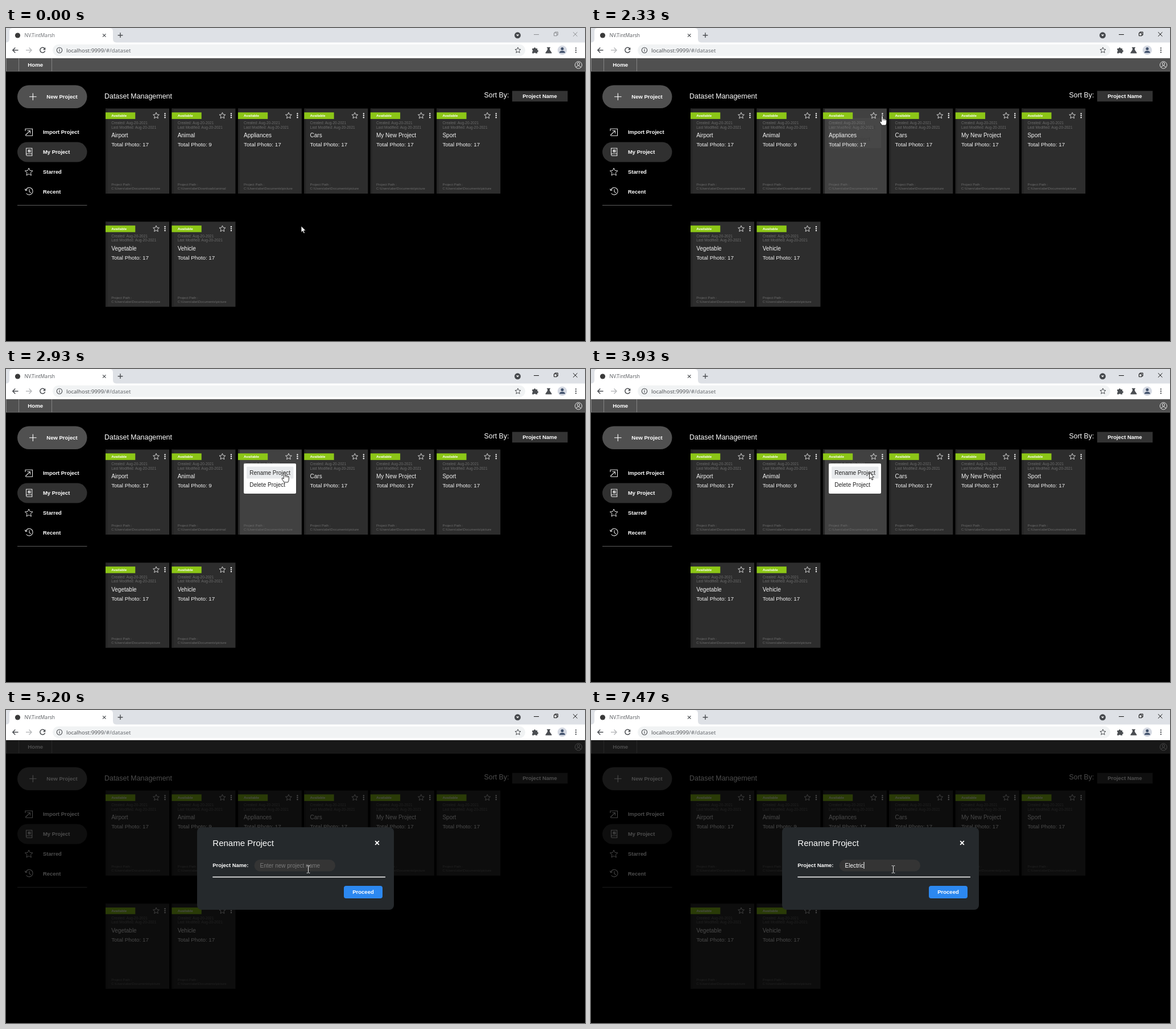
Recreate the animation shown at these times as an HTML page. Size 1018 by 550 pixels, loop 8000 ms.

```html
<!DOCTYPE html>
<html lang="en">
<head>
<meta charset="utf-8">
<title>Dataset Management</title>
<style>
  html, body { margin: 0; width: 100%; height: 100%; overflow: hidden; background: #000; }
  svg { display: block; width: 100%; height: 100%; font-family: "Liberation Sans", Arial, sans-serif; }
  .ui { font-family: "Open Sans", "Noto Sans", sans-serif; }
  .b { font-weight: bold; }
  text { white-space: pre; }
</style>
</head>
<body>
<svg id="stage" viewBox="0 0 1018 550"></svg>
<script>
const LOOP = 8000, FPS = 15;
const stage = document.getElementById('stage');

// Markup helpers
const rect = (x, y, w, h, fill, r = 0, more = '') =>
  `<rect x="${x}" y="${y}" width="${w}" height="${h}" rx="${r}" fill="${fill}" ${more}/>`;
const label = (x, y, size, fill, str, more = '') =>
  `<text x="${x}" y="${y}" font-size="${size}" fill="${fill}" ${more}>${str}</text>`;
const bold = (x, y, size, fill, str, more = '') => label(x, y, size, fill, str, `class="b" ${more}`);
const line = (d, stroke, width = 1, more = '') =>
  `<path d="${d}" fill="none" stroke="${stroke}" stroke-width="${width}" ${more}/>`;
const shape = (d, fill, more = '') => `<path d="${d}" fill="${fill}" ${more}/>`;
const disc = (x, y, r, fill, more = '') => `<circle cx="${x}" cy="${y}" r="${r}" fill="${fill}" ${more}/>`;
const ring = (x, y, r, stroke, width = 1) => disc(x, y, r, 'none', `stroke="${stroke}" stroke-width="${width}"`);
const group = (id, body, more = '') => `<g id="${id}" ${more}>${body}</g>`;
const dots = (x, y, gap, r, fill) => [-1, 0, 1].map(i => disc(x, y + i * gap, r, fill)).join('');
const cross = (x, y, r) => `M${x - r} ${y - r}l${2 * r} ${2 * r}m0 ${-2 * r}l${-2 * r} ${2 * r}`;
const plus = (x, y, r) => `M${x - r} ${y}h${2 * r}M${x} ${y - r}v${2 * r}`;

function star(x, y, r, stroke, width = 1) {
  let d = '';
  for (let i = 0; i < 10; i++) {
    const a = i * Math.PI / 5, k = i % 2 ? r * 0.46 : r;
    d += `${i ? 'L' : 'M'}${(x + k * Math.sin(a)).toFixed(2)} ${(y - k * Math.cos(a)).toFixed(2)}`;
  }
  return line(d + 'Z', stroke, width, 'stroke-linejoin="round"');
}

function browser() {
  const ink = '#4a4d51';
  return rect(0, 0, 1018, 53, '#dee1e6')
    + shape('M0 25.5Q6 25.5 6 19V6Q6 0 12 0H182Q188 0 188 6V19Q188 25.5 194 25.5H1018V53H0Z', '#fff')
    + disc(20.5, 13, 4.6, '#3a3a3a')
    + label(32.5, 16.2, 8.6, '#5f6368', 'NV.TintMarsh', 'class="ui" id="tab"')
    + line(cross(172.8, 13, 2.7), ink, 1.2) + line(plus(201, 12.7, 4.4), ink, 1.4)
    + disc(899.5, 12.8, 5.5, '#46494d') + shape('M896.8 11.6h5.4l-2.7 3z', '#fff')
    + group('win', line('M928 11.5h9M963.5 8.7h5v5h-5zM965 8.5v-1.5h5.3v5.3h-1.6', 'currentColor', 1)
        + line(cross(1000.8, 11, 3.7), 'currentColor', 1))
    + line('M21.5 39H12M16.3 34.5L11.8 39l4.5 4.5', ink, 1.5)
    + line('M35 39h9.8M40.5 34.5l4.5 4.5l-4.5 4.5', '#babcbe', 1.5)
    + line('M68 36.2A4.5 4.5 0 1 0 68.6 40.3', ink, 1.5) + shape('M69.4 34v4.6h-4.6z', ink)
    + rect(82, 28.7, 831, 20.6, '#f1f3f4', 10.3)
    + ring(94, 39, 4.7, ink, 1.1) + line('M94 38.3v3.2M94 36.2v1.2', ink, 1.2)
    + label(106, 42.5, 9.8, '#45484c', 'localhost:9999<tspan fill="#5f6368">/#/dataset</tspan>', 'class="ui"')
    + star(900, 39.2, 5.3, ink)
    + shape('M925.2 36h2.6a1.8 1.8 0 0 1 3.6 0h2.8v2.7a1.8 1.8 0 0 1 0 3.6v2.3h-3a1.7 1.7 0 0 0-3.2 0h-2.8v-3a1.7 1.7 0 0 0 0-3.1z', ink)
    + shape('M951 33.7h6v1.3h-1v3.3l3.6 5.2q.3 1-.8 1h-9.6q-1.1 0-.8-1l3.6-5.2V35h-1z', ink)
    + disc(978, 39, 8.2, '#d5d9e2') + disc(978, 36.6, 2.5, '#41516b') + shape('M973 43.7q0-3.6 5-3.6t5 3.6z', '#41516b')
    + dots(1002, 39, 3.7, 1.15, ink);
}

function navBar() {
  return rect(0, 53, 1018, 23.5, '#505050')
    + line('M0 53.5H1018M0 75.8H1018', '#666', 0.8)
    + line('M.5 53V76M22.5 53V76M80.5 53V76', '#8a8a8a', 0.9)
    + bold(38.3, 68, 9.7, '#fff', 'Home')
    + ring(1006.5, 65, 6.1, '#e8e8e8') + ring(1006.5, 63, 2.2, '#e8e8e8')
    + line('M1002.4 69.3q.6-3 4.1-3t4.1 3', '#e8e8e8');
}

function sidebar() {
  const w = '#e6e6e6';
  const items = [['Import Project', 186], ['My Project', 221], ['Starred', 255.7], ['Recent', 290.5]];
  return rect(20, 100.5, 122.5, 40.5, '#505050', 20.2)
    + line(plus(47.3, 120.8, 6.3), '#fff', 1.1)
    + bold(71.3, 124.2, 9.5, '#fff', 'New Project')
    + rect(20, 200.5, 122.5, 35, '#303030', 17.5)
    + items.map(([s, y]) => bold(65, y, 9.4, '#fff', s)).join('')
    + line('M34 181V177.3H46.5V189.3H34.5', w, 1.1) + line('M34 188.5L42.3 180.6M37.5 180.5h5v5', w, 1.1)
    + line('M35.5 222.3V211.3H45.8V224.5H37.2Q35.5 224.5 35.5 222.6Q35.5 221 37.2 221H45.8', w, 1.1)
    + rect(38.5, 213.8, 5, 4.6, w) + line('M39.5 217.2l1.2-1.6l1.2 1l1-1.6', '#333', 0.7)
    + star(40.2, 253.2, 7.2, w)
    + line('M34.8 284.8A6.3 6.3 0 1 1 35.7 290.5M33.3 282.7l1.4 2.8l2.9-1', w, 1.1)
    + line('M41 283.3V287.7L44 289.6', w, 1.1)
    + line('M20 311.5H142.5', '#5c5c5c', 1.1);
}

function card(name, i) {
  const x = 175 + (i % 6) * 116.45, y = i < 6 ? 141.5 : 340.3, tx = x + 10.2, grey = '#6c6c6c';
  const count = name === 'Animal' ? 9 : 17;
  const dir = name === 'Animal' ? 'Downloads\\animal' : 'Documents\\picture';
  return rect(x, y, 112, 149.5, '#2d2d2d', 0, `id="card${i}"`)
    + rect(x, y, 3.2, 149.5, '#262626')
    + rect(x, y + 6.8, 52.3, 11.6, '#8cc617')
    + bold(tx, y + 14.5, 6.2, '#fff', 'Available')
    + star(x + 89, y + 12.6, 5.7, '#e4e4e4', 0.9)
    + dots(x + 104.5, y + 12.3, 3.4, 1.2, '#f0f0f0')
    + label(tx, y + 27.7, 6.48, grey, 'Created: Aug-20-2021')
    + label(tx, y + 35, 6.48, grey, 'Last Modified: Aug-20-2021')
    + label(tx, y + 50.8, 10, '#f4f4f4', name)
    + label(tx, y + 66.9, 9.85, '#f4f4f4', 'Total Photo: ' + count)
    + label(tx, y + 135.5, 6, grey, 'Project Path :')
    + label(tx, y + 142.8, 5.95, grey, 'C:\\Users\\abe\\' + dir);
}

function content() {
  const names = ['Airport', 'Animal', 'Appliances', 'Cars', 'My New Project', 'Sport', 'Vegetable', 'Vehicle'];
  return label(173, 123.6, 12.45, '#fff', 'Dataset Management')
    + label(840.6, 122.3, 12.3, '#fff', 'Sort By:')
    + rect(890, 110.5, 97.5, 18.7, '#333')
    + bold(938.5, 123, 9.5, '#fff', 'Project Name', 'text-anchor="middle"')
    + names.map(card).join('');
}

function menu() {
  return group('menu', rect(418, 166, 92, 53, '#fff', 2)
    + rect(423, 171.5, 82.5, 21, '#e8eaec', 1, 'id="pick"')
    + label(428.3, 186, 10, '#222', 'Rename Project')
    + label(428.3, 206.8, 10, '#222', 'Delete Project'));
}

function modal() {
  return group('modal', rect(0, 53, 1018, 497, '#000', 0, 'opacity=".7"')
    + rect(336, 206, 346, 145, '#25292c', 8)
    + label(363.3, 239, 15, '#fff', 'Rename Project')
    + line(cross(652.5, 233.5, 3.3), '#fff', 1.9)
    + bold(363.3, 276.3, 9.4, '#fff', 'Project Name:')
    + rect(436.5, 263, 142.5, 20.5, '#343434', 10.2)
    + label(446.5, 276.6, 10, '#fff', '', 'id="field"')
    + rect(447, 267, 1, 12, '#fff', 0, 'id="caret"')
    + line('M363.3 293.5H667', '#fff', 1.6)
    + rect(594, 309, 68, 22, '#2c88f0', 4)
    + bold(628, 323.4, 9.5, '#fff', 'Proceed', 'text-anchor="middle"'));
}

function pointer() {
  const edge = 'stroke="#111" stroke-width=".9" stroke-linejoin="round"';
  return group('cursor',
    group('arrow', shape('M0 0V11.2L2.6 8.8L4.5 13L6.4 12.2L4.6 8.1H8Z', '#fff', edge))
    + group('hand', shape('M-1.3 1.2Q0-1 1.3 1.2V5.3Q2.7 4.4 3.6 5.8Q5 5 5.8 6.5Q7.8 6.2 7.8 8.3V12Q7.8 14 6.3 17H-.8Q-1.6 14.8-3.8 12.3L-4.3 9.8Q-3.2 8.7-1.3 11Z', '#fff', edge)
      + line('M1.3 5.3V8.3M3.6 5.8V8.6M5.8 6.5V9', '#111', 0.7))
    + group('beam', line('M-2.8-6.3H-.8L0-5.6L.8-6.3H2.8M0-5.6V5.6M-2.8 6.3H-.8L0 5.6L.8 6.3H2.8', '#e8e8e8', 1)));
}

stage.innerHTML = browser() + navBar() + sidebar() + content() + menu() + modal() + pointer();
const el = {};
stage.querySelectorAll('[id]').forEach(e => el[e.id] = e);
const show = (e, on) => e.setAttribute('display', on ? 'inline' : 'none');

// Cursor path: [tick, x, y]
const path = [[17, 519, 348], [29, 512, 154], [35, 512, 154], [39, 488, 198], [41, 487.5, 199],
  [44, 489.5, 182], [62, 489.5, 182], [67, 537, 284], [70, 531.5, 280]];
// Ticks at which each letter is typed
const word = 'Electric', keys = [86, 90, 92, 103, 107, 108, 110, 112];

const smooth = p => { p = Math.min(1, Math.max(0, p)); return p * p * (3 - 2 * p); };

function cursorAt(n) {
  if (n <= path[0][0]) return path[0].slice(1);
  for (let i = 1; i < path.length; i++) {
    const [a, ax, ay] = path[i - 1], [b, bx, by] = path[i];
    if (n <= b) {
      const p = smooth((n - a) / (b - a));
      return [ax + (bx - ax) * p, ay + (by - ay) * p];
    }
  }
  return path[path.length - 1].slice(1);
}

function draw(t) {
  const n = Math.floor(t * FPS / 1000 + 0.1);
  const [x, y] = cursorAt(n);
  const open = n >= 60, hover = !open && y < 291, focused = n >= 33;

  el.win.setAttribute('color', focused ? '#111' : '#8b8d90');
  el.tab.setAttribute('fill', focused ? '#54575b' : '#66696d');
  el.card2.setAttribute('fill', hover ? '#414141' : '#2d2d2d');

  const fade = smooth((n * 1000 / FPS - 2290) / 400);
  show(el.menu, fade > 0 && !open);
  el.menu.setAttribute('opacity', fade);
  el.menu.setAttribute('transform', `translate(0 ${-8 * (1 - fade)})`);
  show(el.pick, y > 171 && y < 214);
  el.pick.setAttribute('y', y >= 192.5 ? 192 : 171.5);
  el.pick.setAttribute('fill', y >= 192.5 ? '#dfe1e2' : '#e8eaec');

  show(el.modal, open);
  const typed = word.slice(0, keys.filter(k => k <= n).length);
  el.field.textContent = typed || 'Enter new project name';
  el.field.setAttribute('fill', typed ? '#fff' : '#7b7b7b');
  // The caret blinks every eight ticks, restarting on click and on each key
  const last = Math.max(70, ...keys.filter(k => k <= n));
  show(el.caret, n >= 70 && Math.floor((n - last) / 8) % 2 === 0);
  el.caret.setAttribute('x', 446.7 + (typed && open ? el.field.getComputedTextLength() : 0));

  const inField = open && x > 436 && x < 579 && y > 263 && y < 283.5;
  const hand = hover && n < 59;
  show(el.hand, hand);
  show(el.beam, inField);
  show(el.arrow, !hand && !inField);
  el.cursor.setAttribute('transform', `translate(${x} ${y})`);
}

const start = performance.now();
function tick() {
  draw((performance.now() - start) % LOOP);
  requestAnimationFrame(tick);
}
tick();
</script>
</body>
</html>
```
